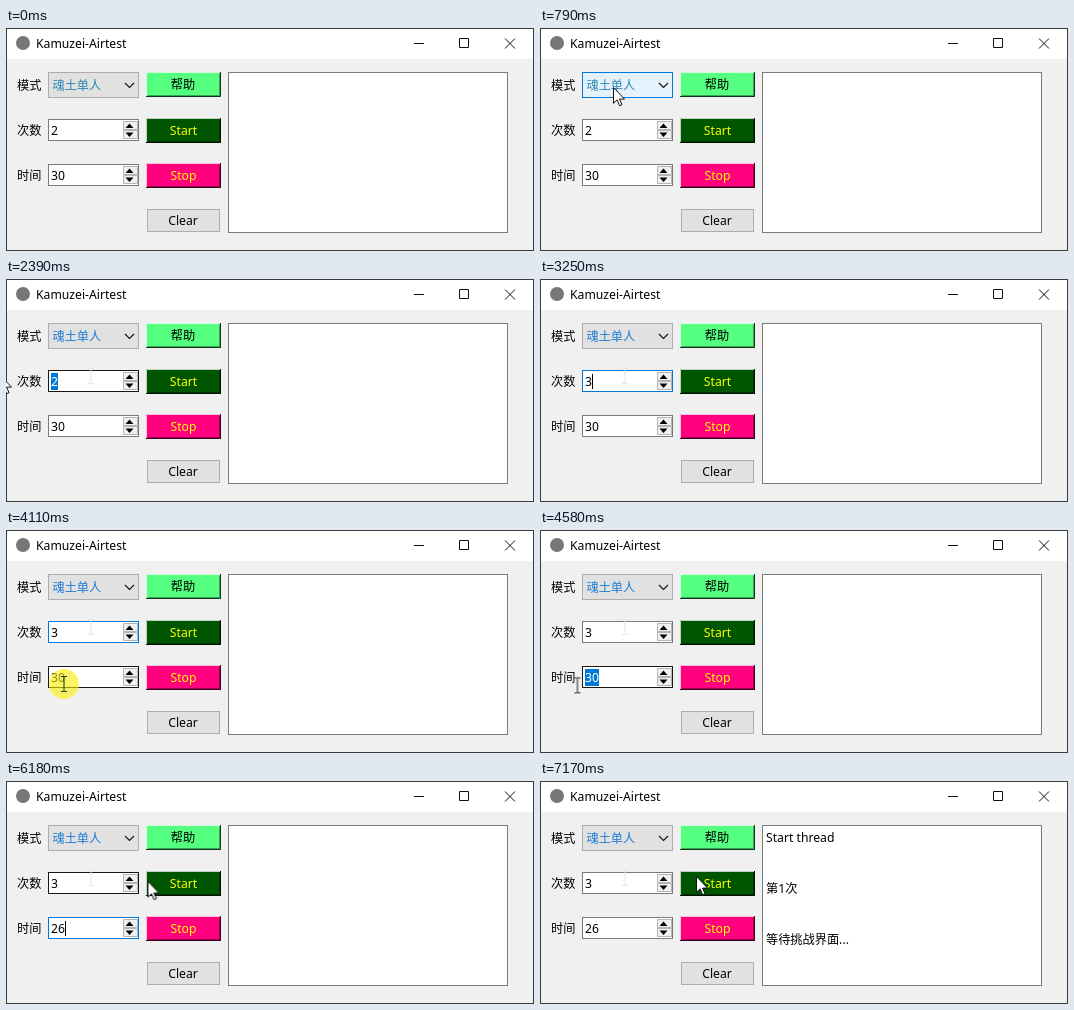
These frames come from a looping animation (528 px wide and 223 px high, 8000 ms). An HTML page:

```html
<!DOCTYPE html>
<html lang="zh">
<head>
<meta charset="utf-8">
<title>Kamuzei-Airtest</title>
<style>
html, body { margin: 0; width: 100%; height: 100%; overflow: hidden; background: #f0f0f0; }
svg { display: block; }
text { font: 12.2px "Noto Sans", "Noto Sans CJK SC", "Noto Sans CJK", sans-serif; }
.mid { text-anchor: middle; }
.yellow { fill: #ff0; }
.line { fill: none; stroke: #111; }
.box { fill: #fff; stroke: #7a7a7a; }
.flat { fill: #e1e1e1; stroke: #adadad; }
.sel { fill: #0078d7; }
.hide { opacity: 0; }

.anim { animation: 8s step-end infinite; }
#combo { animation-name: combo; }
#mode { fill: #2a86b4; animation-name: mode; }
#countBox { animation-name: countBox; }
#timeBox { animation-name: timeBox; }
#count2 { animation-name: count2; }
#countSel { animation-name: countSel; }
#count3 { animation-name: count3; }
#countCaret { animation-name: countCaret; }
#time30 { animation-name: time30; }
#timeSel { animation-name: timeSel; }
#time2 { animation-name: time2; }
#time26 { animation-name: time26; }
#timeCaret { animation-name: timeCaret; }
#ghost { animation-name: ghost; }
#log1 { animation-name: log1; }
#log2 { animation-name: log2; }
#pointer { animation: move 8s linear infinite; }
#click { animation-name: click; }
#arrow { animation-name: arrow; }
#beam { animation-name: beam; }

@keyframes combo {
  6% { fill: #e5f1fb; stroke: #0078d7; }
  9.9% { fill: #cce4f7; stroke: #005499; }
  19.9% { fill: #e5f1fb; stroke: #0078d7; }
  21.5% { fill: #e1e1e1; stroke: #adadad; }
}
@keyframes mode { 9.9% { fill: #1c7cd6; } }
@keyframes countBox {
  22.7% { stroke: #171717; }
  33.1% { stroke: #0078d7; }
  53.9% { stroke: #7a7a7a; }
  76.3% { stroke: #171717; }
  78.5% { stroke: #7a7a7a; }
}
@keyframes timeBox {
  48.9% { stroke: #171717; }
  58% { stroke: #0078d7; }
  83% { stroke: #0078d7; animation-timing-function: linear; }
  89.6%, 100% { stroke: #7a7a7a; }
}
@keyframes count2 { 26% { fill: #fff; } 39.75% { opacity: 0; } }
@keyframes countSel { 26% { opacity: 1; } 39.75% { opacity: 0; } }
@keyframes count3 { 39.75% { opacity: 1; } }
@keyframes countCaret { 40.6% { opacity: 1; } 47.2% { opacity: 0; } }
@keyframes time30 { 56.5% { fill: #fff; } 64.75% { opacity: 0; } }
@keyframes timeSel { 56.5% { opacity: 1; } 64.75% { opacity: 0; } }
@keyframes time2 { 64.75% { opacity: 1; } 71.375% { opacity: 0; } }
@keyframes time26 { 71.375% { opacity: 1; } }
@keyframes timeCaret {
  64.75% { opacity: 1; }
  71.375% { opacity: 1; transform: translateX(7px); }
  78% { opacity: 0; }
}
@keyframes ghost { 24.4% { opacity: 1; } }
@keyframes log1 { 83% { opacity: 1; } }
@keyframes log2 { 86.25% { opacity: 1; } }
@keyframes move {
  0%, 1.5% { transform: translate(242px, 177px); }
  6.5%, 20.6% { transform: translate(73px, 59px); }
  23.1%, 24.4% { transform: translate(85px, 97px); }
  27.3%, 30.6% { transform: translate(-6px, 96px); }
  34.4% { transform: translate(-6px, 96px); }
  35.6%, 43.1% { transform: translate(-14px, 97px); }
  50.6%, 53.9% { transform: translate(58px, 154px); }
  58.8%, 73.1% { transform: translate(28px, 156px); }
  77.2% { transform: translate(141px, 100px); }
  79.6%, 100% { transform: translate(156px, 95px); }
}
@keyframes click {
  9.9% { opacity: .6; } 11.6% { opacity: 0; }
  17.5% { opacity: .6; } 19.9% { opacity: 0; }
  23.5% { opacity: .6; } 24.9% { opacity: 0; }
  30.6% { opacity: .6; } 34.4% { opacity: 0; }
  50.6% { opacity: .6; } 52.25% { opacity: 0; }
  59.4% { opacity: .6; } 63% { opacity: 0; }
  81.4% { opacity: .6; } 83.8% { opacity: 0; }
}
@keyframes arrow {
  0% { opacity: 0; } 1.5% { opacity: 1; }
  22.7% { opacity: 0; } 27% { opacity: 1; }
  48.9% { opacity: 0; } 58.8% { opacity: 1; }
  73.6% { opacity: 0; } 74.6% { opacity: 1; }
}
@keyframes beam {
  22.7% { opacity: 1; } 27% { opacity: 0; }
  48.9% { opacity: 1; } 58.8% { opacity: 0; }
  73.6% { opacity: 1; } 74.6% { opacity: 0; }
}
</style>
</head>
<body>
<svg width="528" height="223" viewBox="0 0 528 223">
  <defs>
    <g id="spin">
      <path d="M117.5 2.5h14v8h-14zM117.5 11.5h14v8h-14z" transform="translate(-42)" fill="#f0f0f0" stroke="#b4b4b4"/>
      <path d="M77.5 9l4-4.5 4 4.5zM77.5 13.5l4 4.5 4-4.5z"/>
    </g>
    <g id="bevel" fill="none">
      <path d="M.5 24V.5H74" stroke="#fff" stroke-opacity=".75"/>
      <path d="M1.5 23.5h72v-22" stroke="#000" stroke-opacity=".35"/>
      <path d="M0 24.5h74.5V0" stroke="#000" stroke-opacity=".8"/>
    </g>
    <path id="ibeam" d="M-3-7.5h2.5l.5.5.5-.5H3M0-7V7M-3 7.5h2.5L0 7l.5.5H3" fill="none"/>
  </defs>

  <rect width="528" height="223" fill="#f0f0f0"/>
  <rect width="528" height="31" fill="#fff"/>
  <circle cx="17" cy="15" r="7" fill="#777"/>
  <text x="30" y="20">Kamuzei-Airtest</text>
  <path class="line" d="M408 15.5h10M453.5 10.5h9v9h-9zM499 10.5l10 10M509 10.5l-10 10"/>

  <text x="11" y="62">模式</text>
  <text x="11" y="107">次数</text>
  <text x="11" y="152">时间</text>

  <rect id="combo" class="flat anim" x="42.5" y="44.5" width="90" height="25"/>
  <text id="mode" class="anim" x="46.5" y="62">魂土单人</text>
  <path class="line" d="M119 55l4.5 4.5L128 55" stroke-width="1.1"/>

  <rect id="countBox" class="box anim" x="42.5" y="91.5" width="90" height="21"/>
  <use href="#spin" x="42" y="91"/>
  <rect id="countSel" class="sel hide anim" x="45" y="94" width="7" height="17"/>
  <text id="count2" class="anim" x="45" y="107">2</text>
  <text id="count3" class="hide anim" x="45" y="107">3</text>
  <rect id="countCaret" class="hide anim" x="52" y="95" width="1" height="15"/>
  <use id="ghost" class="hide anim" href="#ibeam" x="85" y="97" stroke="#e4e4e4"/>

  <rect id="timeBox" class="box anim" x="42.5" y="136.5" width="90" height="21"/>
  <use href="#spin" x="42" y="136"/>
  <rect id="timeSel" class="sel hide anim" x="45" y="139" width="14" height="17"/>
  <text id="time30" class="anim" x="45" y="152">30</text>
  <text id="time2" class="hide anim" x="45" y="152">2</text>
  <text id="time26" class="hide anim" x="45" y="152">26</text>
  <rect id="timeCaret" class="hide anim" x="52" y="140" width="1" height="15"/>

  <rect x="140" y="44" width="75" height="25" fill="#55ff7f"/>
  <use href="#bevel" x="140" y="44"/>
  <text class="mid" x="177" y="61">帮助</text>
  <rect x="140" y="90" width="75" height="25" fill="#050"/>
  <use href="#bevel" x="140" y="90"/>
  <text class="mid yellow" x="177.5" y="107">Start</text>
  <rect x="140" y="135" width="75" height="25" fill="#ff007f"/>
  <use href="#bevel" x="140" y="135"/>
  <text class="mid yellow" x="177.5" y="152">Stop</text>
  <rect class="flat" x="141.5" y="181.5" width="72" height="22"/>
  <text class="mid" x="177" y="197">Clear</text>

  <rect class="box" x="222.5" y="44.5" width="279" height="160"/>
  <text id="log1" class="hide anim" x="226" y="61">Start thread</text>
  <g id="log2" class="hide anim">
    <text x="226" y="112">第1次</text>
    <text x="226" y="163">等待挑战界面...</text>
  </g>

  <rect x=".5" y=".5" width="527" height="222" fill="none" stroke="#3c3c3c"/>

  <g id="pointer">
    <circle id="click" class="hide anim" r="15" fill="#f8f000"/>
    <path id="arrow" class="anim" d="M.5.5v15.8l3.6-3.4 2.5 5.8 2.4-1-2.5-5.6h5z" fill="#fff" stroke="#111"/>
    <use id="beam" class="hide anim" href="#ibeam" stroke="#222"/>
  </g>
</svg>
</body>
</html>
```
